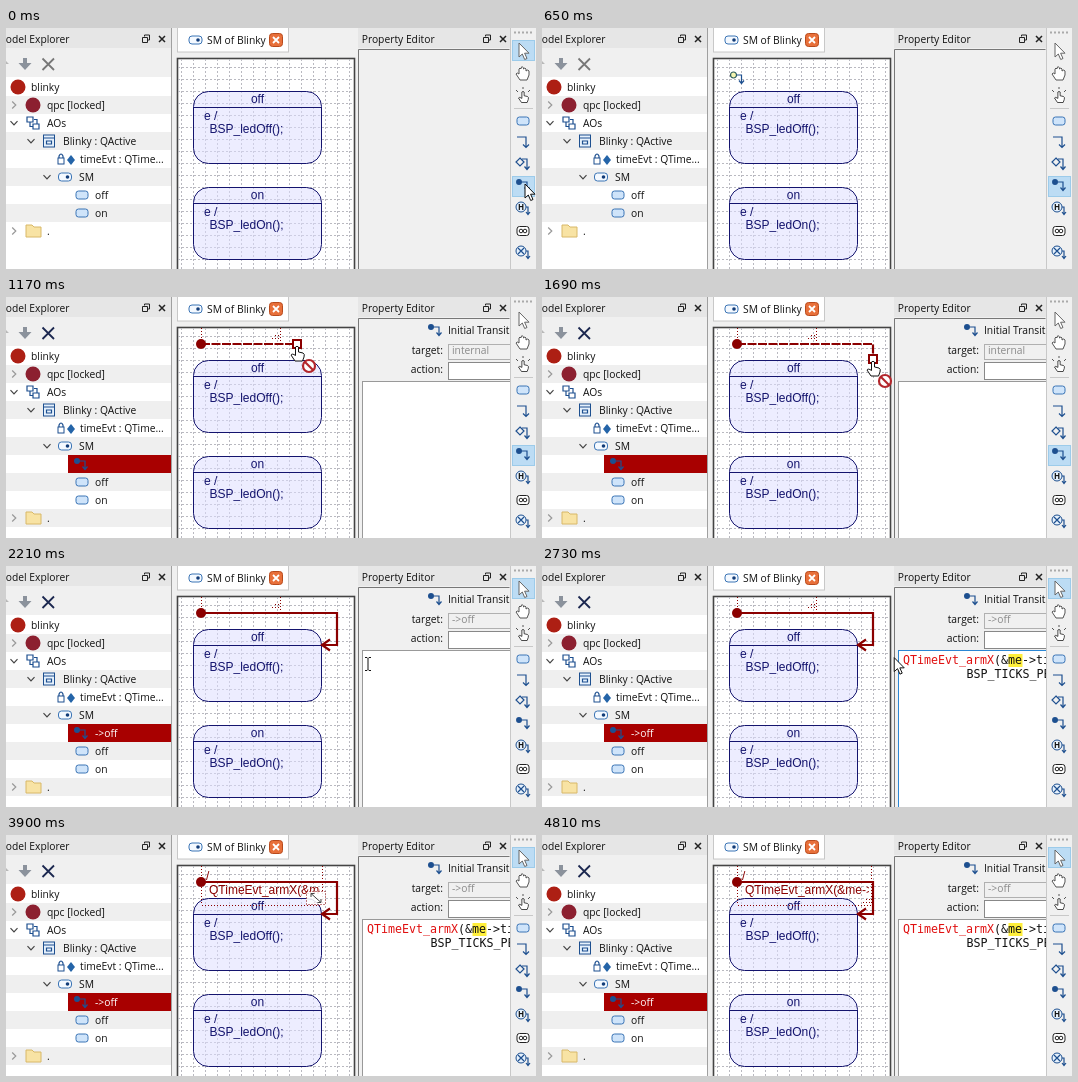
Animation of 530x241 px, one loop 4.94 s. Source, as an HTML page:

```html
<!DOCTYPE html>
<html lang="en">
<head>
<meta charset="utf-8">
<title>State machine editor</title>
<style>
html, body { margin: 0; width: 100%; height: 100%; overflow: hidden; background: #f0f0f0; }
svg { display: block; width: 100vw; height: 100vh; }
text { font: 10.3px "Open Sans", "Noto Sans", sans-serif; fill: #111; white-space: pre; }
.dia { font: 12px "Liberation Sans", Arial, sans-serif; fill: #14146e; }
.code { font: 11.63px "DejaVu Sans Mono", monospace; }
.red { fill: #8b0000; }
.dim { fill: #8a8a8a; }
.wire { fill: none; stroke: #8b0000; stroke-width: 2.2; }
.ink { fill: none; stroke: #1d4f8f; stroke-width: 1.2; }
.edge { fill: none; stroke: #a0a0a0; }
.dots { fill: none; stroke: #8b0000; stroke-dasharray: 1 2; }
</style>
</head>
<body>
<svg id="stage" viewBox="0 0 530 241" preserveAspectRatio="none"></svg>
<script>
const LOOP = 4940, STEP = 130;
const stage = document.getElementById('stage');
const at = (x, y, body, id = '') => `<g ${id && `id="${id}"`} transform="translate(${x} ${y})">${body}</g>`;
const box = (x, y, w, h, fill, more = '') => `<rect x="${x}" y="${y}" width="${w}" height="${h}" fill="${fill}" ${more}/>`;
const label = (x, y, s, cls = '', more = '') => `<text x="${x}" y="${y}" class="${cls}" ${more}>${s}</text>`;
const path = (d, cls = 'ink', more = '') => `<path d="${d}" class="${cls}" ${more}/>`;
const disc = (x, y, r, fill, more = '') => `<circle cx="${x}" cy="${y}" r="${r}" fill="${fill}" ${more}/>`;
const END = 'text-anchor="end"', MID = 'text-anchor="middle"';

// Icons, drawn around their centre
const stateIcon = box(-6, -4, 12, 8, '#cfe4fa', 'rx="2.5" stroke="#3b74b5"');
const smIcon = box(-6.5, -4, 13, 8, '#f4f9ff', 'rx="3" stroke="#3b74b5"') + disc(2.5, 0, 1.8, '#123c78');
const elbow = path('M-1-3H4V5M1.500 2.500 4 5.500 6.500 2.500');
const initIcon = disc(-4, -3, 3, '#1d4f8f') + elbow;
const dropIcon = disc(-4, -3, 3, '#f4f4b0', 'stroke="#2a5a5a" stroke-width="1.2"') + elbow;
const openDown = path('M-3.500-1.800 0 1.800 3.500-1.800', '', 'fill="none" stroke="#444" stroke-width="1.200"');
const openSide = path('M-1.800-3.500 1.800 0-1.800 3.500', '', 'fill="none" stroke="#999" stroke-width="1.200"');
const titleIcons = x => path(`M${x - 1.5} 8.500v-1.500h5v5h-1.500M${x - 3.5} 9.500h5v5h-5z`, '', 'fill="none" stroke="#222"') +
  path(`M${x + 13} 8l6 6m0-6l-6 6`, '', 'stroke="#222" stroke-width="1.500"');
const pointer = ink => path('M0 0V14L3.300 11 5.700 16.500 8 15.500 5.600 10.200H10Z', '', `fill="#fff" stroke="${ink}"`);
const hand = path('M-1.500 0Q0-1.500 1.500 0V5L6 6Q8 7 7 10L5.500 14H-2L-6 8Q-5 6-1.500 8.500Z', '', 'fill="#fff" stroke="#111"');
const palm = path('M-3 7-7 1Q-6-1-4 1V-4Q-3-6-2-4V-5Q-1-8 0.500-5V-4Q2-6 3-4V-2Q5-4 6-2V2L4 7Z', '', 'fill="#fff" stroke="#555"');
const resize = box(-9.5, -6.5, 19, 13, '#fff', 'fill-opacity=".85"') + path('M-9.500-6.500H9.500V6.500H-9.500Z', 'dots') +
  path('M-5-4.500 5 4.500M-5-1V-4.500H-1.500M5 1V4.500H1.500', '', 'fill="none" stroke="#444"');
const ibeam = path('M-3-6.500H-1L0-5.500 1-6.500H3M0-5.500V5.500M-3 6.500H-1L0 5.500 1 6.500H3', '', 'fill="none" stroke="#111"');
const barred = disc(0, 0, 6, '#fff', 'stroke="#b3262c" stroke-width="2.200"') +
  path('M-4-4 4 4', '', 'stroke="#b3262c" stroke-width="2.200"');
const downStep = path('M-1-5H4V5M1.500 2.500 4 5.500 6.500 2.500');

const ROW = 18;
const rowY = i => 59 + ROW * i;
const name = (x, i, s, more) => label(x, rowY(i) + 3.5, s, '', more);

function explorer() {
  let rows = '';
  for (let i = 1; i < 9; i += 2) rows += box(0, rowY(i) - 9, 165, ROW, '#efefef');
  rows += box(0, rowY(9) - 9, 165, ROW, '#efefef', 'id="lastRow"');
  const leafs = at(76, rowY(6), stateIcon) + name(89, 6, 'off') +
    at(76, rowY(7), stateIcon) + name(89, 7, 'on') +
    at(8, rowY(8), openSide) + name(41, 8, '.') +
    path(`M20 ${rowY(8) - 6}h6l2 2h7v10h-15z`, '', 'fill="#f8e3a4" stroke="#d8b868"');
  return box(0, 0, 165, 20, '#e6e6e6') + label(63.5, 15, 'Model Explorer', '', END) + titleIcons(140) +
    path('M-4 29 3 36H-1V42H-4Z', '', 'fill="#b8b8b8"') +
    path('M17 30h4v5h4.500l-6.500 7-6.500-7h4.500z', '', 'fill="#8b929c"') +
    path('M36.500 30.500 48 42M48 30.500 36.500 42', '', 'id="erase" stroke-width="1.800"') +
    box(0, 49, 165, 192, '#fff') + rows +
    disc(12, rowY(0), 7.5, '#ad1f14') + name(25, 0, 'blinky') +
    at(8, rowY(1), openSide) + disc(27, rowY(1), 7.5, '#8c2030') + name(41, 1, 'qpc [locked]') +
    at(8, rowY(2), openDown) + at(27, rowY(2), path('M-6-6h6v5h-6zM0 1h6v5h-6zM-3-1v4.500h3M1-3.500h3v4')) + name(41, 2, 'AOs') +
    at(25, rowY(3), openDown) +
    at(43, rowY(3), box(-5.5, -6, 11, 12, '#e6f1fc', 'stroke="#1d4f8f"') + path('M-5-3H5M-2.500 0H2.500V3H-2.500Z')) + name(57, 3, 'Blinky : QActive') +
    at(55, rowY(4), box(-3, -1, 6, 6, '#fff', 'stroke="#1d4f8f"') + path('M-2-1V-3Q0-7 2-3V-1')) +
    path(`M65 ${rowY(4) - 4}l4 5-4 5-4-5z`, '', 'fill="#2464a8"') + name(74, 4, 'timeEvt : QTime...') +
    at(41, rowY(5), openDown) + at(59, rowY(5), smIcon) + name(73, 5, 'SM') +
    `<g id="pick">` + box(62, rowY(6) - 9, 103, ROW, '#a80000') + at(75, rowY(6), initIcon) +
    name(89, 6, '-&gt;off', 'id="pickName" style="fill:#fff"') + '</g>' + at(0, 0, leafs, 'leafs') +
    path('M165.500 0V241', 'edge');
}

function state(y, title, call) {
  return box(187.5, y + .5, 128, 72, '#dedeff', 'rx="15" fill-opacity=".55" stroke="#14146e"') +
    path(`M187.500 ${y + 16.5}H315.500`, '', 'stroke="#14146e"') +
    label(251.5, y + 12, title, 'dia', MID) + label(198, y + 29, 'e /', 'dia') + label(203.5, y + 42, call, 'dia');
}

function canvas() {
  let grid = '';
  for (let x = 175.5; x < 348; x += 12) grid += `M${x} 31V241`;
  for (let y = 39.5; y < 241; y += 12) grid += `M172 ${y}H348`;
  return box(166, 0, 186, 241, '#f0f0f0') + box(171.5, -2, 111, 26, '#fff', 'stroke="#c8c8c8"') +
    at(189.5, 12, smIcon) + label(201, 16, 'SM of Blinky') +
    box(263.5, 5.5, 13, 13, '#e8703a', 'rx="3" stroke="#b84a1c"') + path('M267 9l6 6m0-6l-6 6', '', 'stroke="#fff" stroke-width="1.800"') +
    box(171.5, 30.5, 177, 214, '#fff', 'stroke="#444" stroke-width="1.6"') +
    path(grid, '', 'stroke="#b9b9c0" stroke-dasharray="2 2"') +
    state(63, 'off', 'BSP_ledOff();') + state(159, 'on', 'BSP_ledOn();') +
    `<clipPath id="cut"><rect id="cutBox" x="196" y="30" height="42"/></clipPath>` +
    `<g id="note" clip-path="url(#cut)">` + label(200, 45, '/', 'dia red') +
    label(203, 59, 'QTimeEvt_armX(&amp;me-&gt;timeEvt,', 'dia red') + '</g>' +
    `<g id="link">` + path('', 'dots', 'id="frame"') + path('', 'wire', 'id="wire"') + disc(195, 47, 5, '#8b0000') +
    path('M324 73.500 316 79 324 84.500', 'wire', 'id="head"') +
    at(0, 0, box(-4, -4, 8, 8, '#fff', 'stroke="#8b0000" stroke-width="2"'), 'grip') + '</g>';
}

function editor() {
  const code = `<text x="361" y="98" class="code"><tspan fill="#e01010">QTimeEvt_armX</tspan>(&amp;me-&gt;timeEvt,</text>` +
    label(424.5, 111.5, 'BSP_TICKS_PER_SEC/2,', 'code');
  return box(352, 0, 152, 241, '#f0f0f0') + box(352, 0, 152, 20, '#e6e6e6') +
    label(355.7, 15, 'Property Editor') + titleIcons(481) + path('M352.500 241V21.500H503.500', '', 'fill="none" stroke="#777"') +
    `<g id="form">` + at(429, 33, initIcon) + label(442, 37, 'Initial Transition') +
    label(437, 56.5, 'target:', '', END) + box(442.5, 47.5, 80, 15, '#f0f0f0', 'stroke="#b0b0b0"') + label(446, 56.5, '', 'dim', 'id="goal"') +
    label(437, 75.5, 'action:', '', END) + box(442.5, 65.5, 80, 17, '#fff', 'stroke="#888"') +
    box(356.5, 84.5, 160, 160, '#fff', 'id="area"') +
    `<g id="code">` + box(466.5, 88, 14, 13, '#ffef3a') + code + '</g></g>';
}

function palette() {
  const tools = [
    [22, at(-4, -7, pointer('#666'))],
    [45, palm],
    [68, at(0, -4, `<g transform="scale(.75)">${hand}</g>`) + path('M-5-4-7-6M0-7V-9M5-4 7-6', '', 'stroke="#555"')],
    [93, stateIcon], [114, path('M-6-5H3V5M0 2.500 3 5.500 6 2.500')],
    [136, path('M-3-6 1-2-3 2-7-2Z') + downStep],
    [157, initIcon],
    [180, disc(-2, -1, 5, '#e6f1fc', 'stroke="#1d4f8f"') + label(-2, 2, 'H', '', MID + ' style="font-size:8px;font-weight:700"') + path('M3-1H5V6M3 4 5 6.500 7 4')],
    [203, box(-6, -4.5, 12, 9, '#fff', 'rx="2.5" stroke="#222"') + disc(-2, 0, 1.8, 'none', 'stroke="#222"') + disc(2, 0, 1.8, 'none', 'stroke="#222"')],
    [224, disc(-2, -1, 5, '#e6f1fc', 'stroke="#1d4f8f"') + path('M-5-4 1 2M1-4-5 2') + path('M3-1H5V6M3 4 5 6.500 7 4')]
  ];
  const lit = (y, id) => box(506.5, y - 9.5, 22, 20, '#bcdcf4', `id="${id}" stroke="#9ccbea"`);
  return box(504, 0, 26, 241, '#f0f0f0') + path('M504.500 0V241', '', 'stroke="#c8c8c8"') +
    path('M508 80.500H527', '', 'stroke="#c8c8c8"') + path('M508 4.500H527', '', 'stroke="#aaa" stroke-width="2" stroke-dasharray="2 2"') +
    lit(22, 'litArrow') + lit(158, 'litInit') + tools.map(([y, icon]) => at(517, y, icon)).join('');
}

stage.innerHTML = explorer() + canvas() + editor() + palette() +
  at(0, 0, pointer('#111'), 'arrow') + at(0, 0, dropIcon, 'drop') + at(0, 0, hand, 'hand') +
  at(0, 0, barred, 'barred') + at(0, 0, ibeam, 'ibeam') + at(0, 0, resize, 'resize');

const ui = {};
stage.querySelectorAll('[id]').forEach(el => ui[el.id] = el);
const show = (id, on) => ui[id].style.display = on ? '' : 'none';
const put = (id, on, [x, y] = [0, 0]) => {
  show(id, on);
  ui[id].setAttribute('transform', `translate(${x} ${y})`);
};
const set = (id, key, value) => ui[id].setAttribute(key, value);
const clamp = (v, a, b) => Math.min(b, Math.max(a, v));
const ease = k => k * k * (3 - 2 * k);
const mix = (a, b, k) => a.map((v, i) => v + (b[i] - v) * k);

const PULL = [[205, 47], [236, 47], [266, 47], [291, 47], [305, 47], [318, 47], [330, 49], [331, 62], [329, 74], [320, 79]];
const SIZE = [[274, 44], [294, 58], [316, 70], [323, 70], [327, 70], [329, 70]];

function draw(t) {
  const n = Math.floor(t / STEP);
  const added = n >= 6, linked = n >= 17, pasted = n >= 21, sizing = n >= 27;

  // Tool choice and its trip to the canvas
  show('litArrow', n < 1 || linked);
  show('litInit', !linked);
  put('drop', n >= 1 && n < 6, mix([517, 157], [195.5, 50], ease(clamp(n / 5, 0, 1))));

  // Tree and form
  set('erase', 'stroke', added ? '#1c2850' : '#777');
  show('lastRow', added);
  show('pick', added);
  show('pickName', linked);
  put('leafs', true, [0, added ? ROW : 0]);
  show('form', added);
  ui.goal.textContent = linked ? '->off' : 'internal';
  show('code', pasted);
  set('area', 'stroke', n >= 18 && !sizing ? '#2a86d4' : '#999');

  // Transition being pulled to its target
  const tip = PULL[clamp(n - 6, 0, PULL.length - 1)];
  const pulling = added && !linked;
  const onState = tip[1] > 76;
  show('link', added);
  show('head', linked);
  set('wire', 'd', linked || onState ? `M195 47H331V79H${linked ? 316 : tip[0]}` : `M195 47H${tip[0]}V${tip[1]}`);
  set('wire', 'stroke-dasharray', pulling ? '9 1.5' : 'none');
  put('grip', pulling, tip);
  put('hand', pulling, [tip[0], tip[1] + 3]);
  put('barred', pulling && !onState, [tip[0] + 12, tip[1] + 22]);

  // Action label and its corner
  const [cx, cy] = SIZE[clamp(n - 28, 0, SIZE.length - 1)];
  set('frame', 'd', `M195.500 31V${cy}M${cx + .5} 31V${cy}M${cx - 8} ${cy - 2.5}H${cx}M${cx - 5} ${cy - 5.5}H${cx}` +
    (sizing ? `M196 ${cy + .5}H${cx}` : ''));
  show('note', sizing);
  set('cutBox', 'width', cx - 198);
  set('cutBox', 'height', cy - 28);

  // Pointers
  const grab = [cx - 6, cy - 7];
  put('ibeam', linked && !pasted, [362, 98]);
  put('arrow', n < 1 || (n >= 21 && n < 25), n < 1 ? [519, 156] : mix([362, 98], grab, ease((n - 20) / 5)));
  put('resize', n >= 25 && n < 37, grab);
}

function tick(now) {
  draw(now % LOOP);
  requestAnimationFrame(tick);
}
draw(0);
requestAnimationFrame(tick);
</script>
</body>
</html>
```
